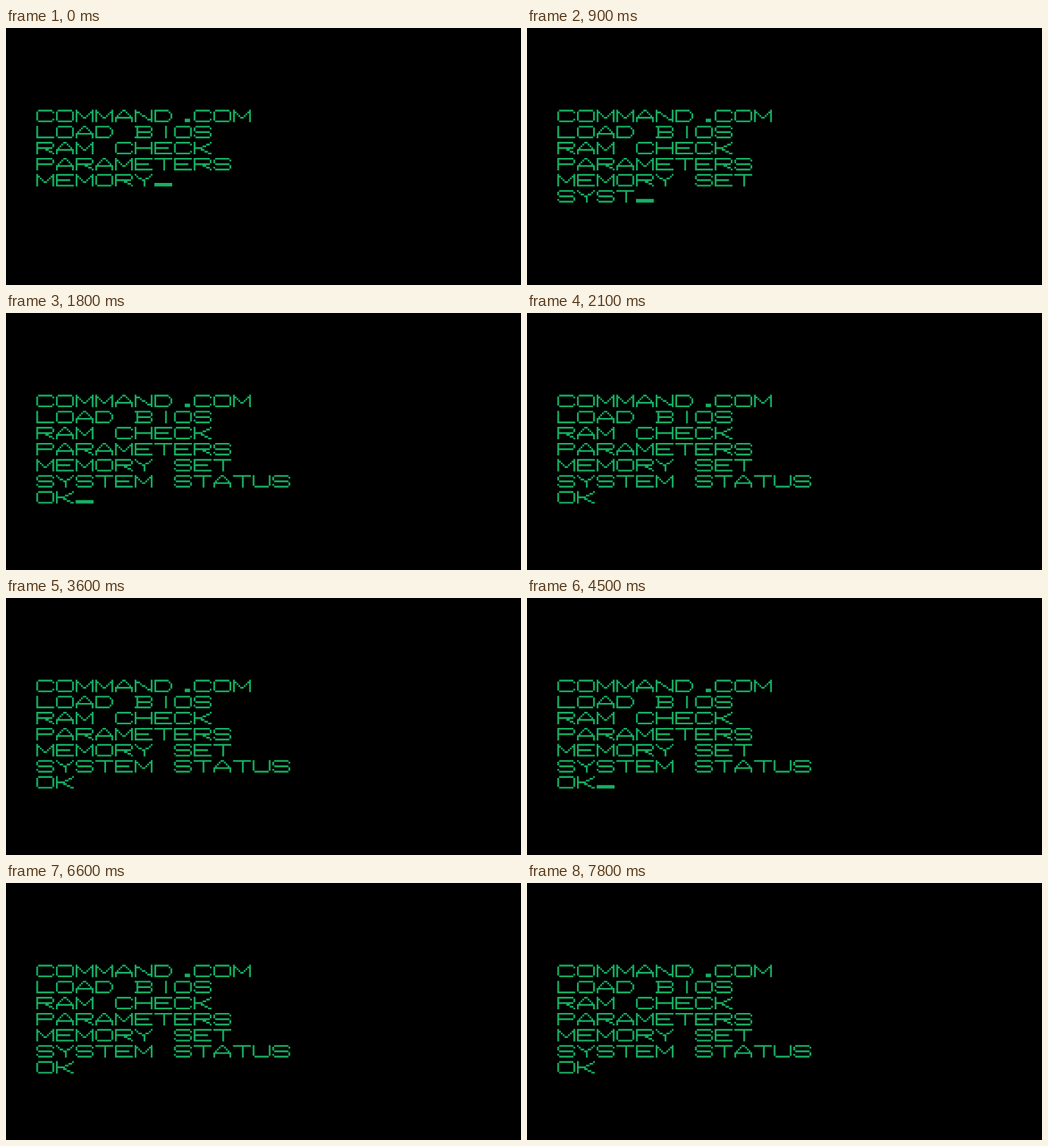
An HTML page with a canvas that plays this animation: 700 by 350 pixels, repeating every 8000 ms.

```html
<!DOCTYPE html>
<html lang="en">
<head>
<meta charset="utf-8">
<title>Boot screen</title>
<style>
html, body { margin: 0; width: 100%; height: 100%; overflow: hidden; background: #000; }
canvas { display: block; }
</style>
</head>
<body>
<canvas id="screen" width="700" height="350"></canvas>
<script>
const ctx = document.getElementById('screen').getContext('2d');
const LOOP = 8000, STEP = 300, DOT = 700 / 288;
const LEFT = 41.2, TOP = 111.3, CELL_W = 11, CELL_H = 9;

// Each glyph: polylines of xy points on a 10 by 7 grid
const GLYPHS = {
  A: '06 04 40 50 94 96|04 94',
  B: '00 80 91 92 83 94 95 86 06|10 16|13 83',
  C: '91 80 10 01 05 16 86 95',
  D: '00 70 92 94 76 06 00',
  E: '90 00 06 96|03 73',
  H: '00 06|90 96|03 93',
  I: '60 66',
  K: '00 06|03 33 90|33 96',
  L: '00 06 96',
  M: '06 00 44 54 90 96',
  N: '06 00 96 90',
  O: '10 80 91 95 86 16 05 01 10',
  P: '06 00 80 91 92 83 03',
  R: '06 00 80 91 92 83 03|43 96',
  S: '91 80 10 01 02 13 83 94 95 86 16 05',
  T: '00 90|50 56',
  U: '00 05 16 86 95 90',
  Y: '00 43 53 90|53 56',
  '.': '65 85|66 86',
  _: '05 95|06 96'
};

const START = 'COMMAND.COM\nLOAD BIOS\nRAM CHECK\nPARAMETERS\nMEMORY';
const TYPED = ' SET\nSYSTEM STATUS\nOK';

function addLine(col, row, [x1, y1], [x2, y2]) {
  const n = Math.max(Math.abs(x2 - x1), Math.abs(y2 - y1));
  for (let i = 0; i <= n; i++) {
    const x = Math.round(x1 + (x2 - x1) * i / n);
    const y = Math.round(y1 + (y2 - y1) * i / n);
    ctx.rect(LEFT + (col + x) * DOT, TOP + (row + y) * DOT, DOT, DOT);
  }
}

function addGlyph(char, col, row) {
  if (!GLYPHS[char]) return;
  for (const stroke of GLYPHS[char].split('|')) {
    const points = stroke.split(' ').map(p => [+p[0], +p[1]]);
    for (let i = 1; i < points.length; i++) addLine(col, row, points[i - 1], points[i]);
  }
}

function draw(time) {
  const step = Math.floor(time / STEP);
  const count = 3 * step + Math.max(0, step - 3);
  const blink = step * STEP % 720;
  const cursor = step <= 6 || (blink >= 180 && blink < 540);
  const text = START + TYPED.slice(0, count) + (cursor ? '_' : '');

  ctx.fillStyle = '#000';
  ctx.fillRect(0, 0, 700, 350);
  ctx.fillStyle = '#17b062';
  ctx.beginPath();
  text.split('\n').forEach((line, row) =>
    [...line].forEach((char, col) => addGlyph(char, col * CELL_W, row * CELL_H)));
  ctx.fill();
}

const start = performance.now();
function tick() {
  draw((performance.now() - start) % LOOP);
  requestAnimationFrame(tick);
}
tick();
</script>
</body>
</html>
```
